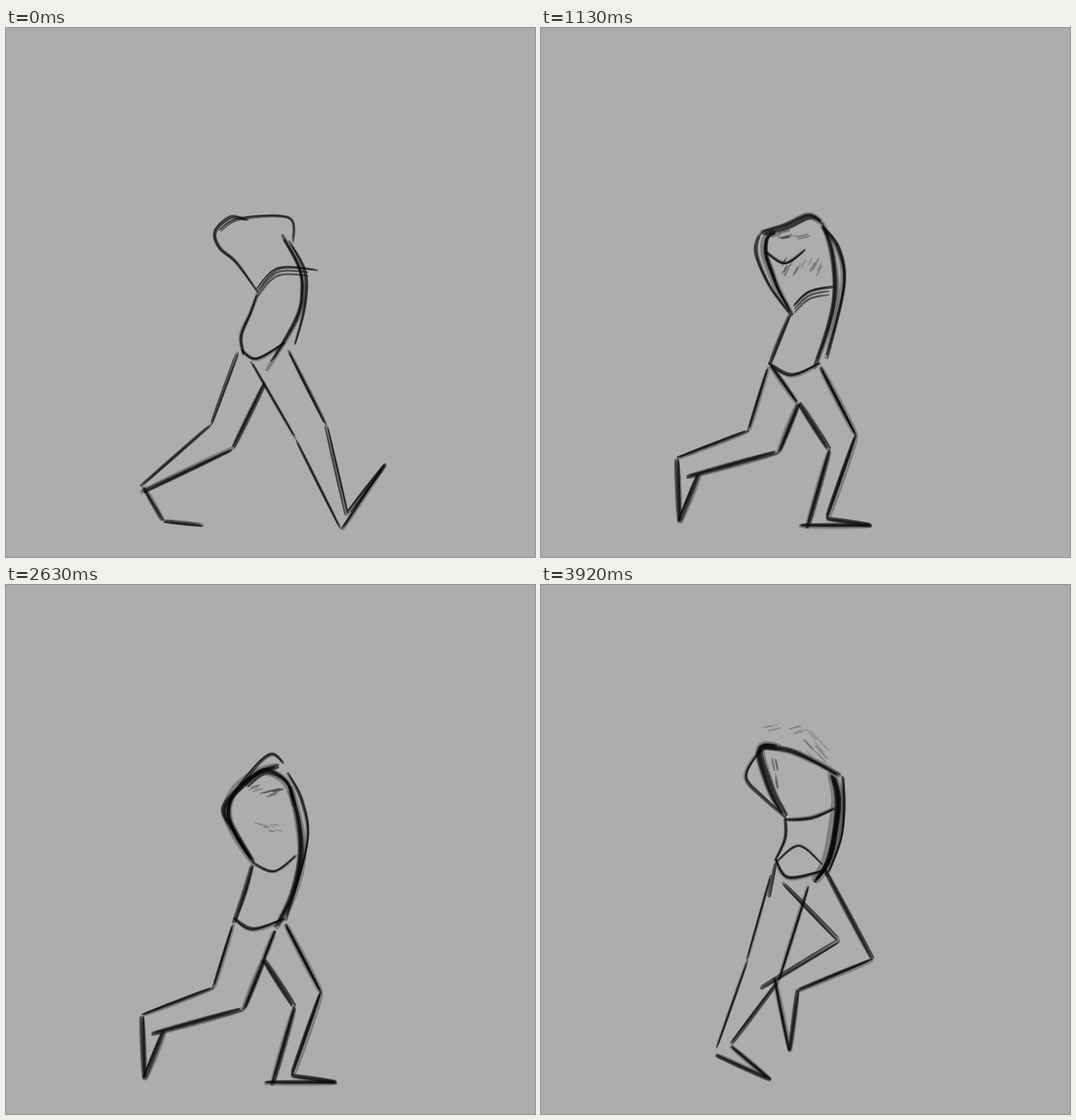
Animation, 748 px wide and 748 px high, one loop 4 s. Source, as an HTML page with a canvas:

```html
<!DOCTYPE html>
<html lang="en">
<head>
<meta charset="utf-8">
<title>Walk cycle sketch</title>
<style>
html, body { margin: 0; width: 100%; height: 100%; overflow: hidden; background: #adadad; }
canvas { display: block; width: 748px; height: 748px; }
</style>
</head>
<body>
<canvas id="stage" width="748" height="748"></canvas>
<script>
const ctx = document.getElementById('stage').getContext('2d');
const FPS = 24, LOOP = 4000;

// Key lines are [weight, x, y, x, y, ...]. A leg has a back edge, a front edge and a foot.
const contact = {
  rear: {
    back: [3, 328, 458, 290, 561, 190, 648],
    front: [5, 366, 502, 321, 594, 190, 657],
    foot: [4, 195, 648, 223, 697, 279, 703]
  },
  lead: {
    back: [2.5, 347, 472, 410, 582, 473, 708],
    front: [3.5, 399, 455, 452, 560, 482, 690],
    foot: [4, 483, 686, 537, 616, 475, 710]
  },
  torso: {
    back: [3, 342, 272, 318, 267, 296, 288, 302, 311, 326, 332, 356, 374],
    waist: [3.5, 356, 374, 346, 402, 332, 435, 336, 462],
    top: [2, 302, 287, 330, 270, 400, 268, 406, 304],
    front: [5, 390, 292, 414, 335, 420, 370, 411, 412, 368, 485],
    shell: [2.5, 400, 300, 423, 345, 422, 395, 408, 448],
    base: [3.5, 333, 455, 355, 468, 395, 445],
    band: [2, 354, 372, 385, 340, 441, 342]
  }
};

const down = {
  swing: {
    back: [4, 322, 479, 294, 570, 192, 609],
    front: [6, 364, 530, 336, 600, 206, 635],
    foot: [6, 192, 609, 196, 700, 224, 632]
  },
  stance: {
    back: [6, 365, 530, 408, 597, 376, 708],
    front: [6, 395, 479, 446, 577, 405, 695],
    foot: [5, 403, 694, 468, 704, 365, 704]
  },
  // Torso turned towards and away from the viewer, on alternate steps
  torsos: [{
    back: [7, 330, 288, 318, 296, 316, 318, 324, 342, 336, 372, 355, 406],
    flank: [3, 310, 290, 304, 308, 308, 330, 325, 368, 355, 408],
    waist: [4, 352, 404, 338, 438, 323, 476],
    top: [7, 310, 290, 345, 281, 378, 266, 398, 276],
    front: [6, 398, 275, 411, 315, 417, 370, 408, 420, 386, 482],
    shell: [5, 396, 280, 420, 312, 427, 366, 403, 468],
    base: [4, 322, 474, 355, 491, 396, 474],
    band: [2.5, 357, 394, 380, 373, 416, 366],
    crotch: [5, 324, 477, 362, 530],
    fold: [3, 318, 316, 345, 332, 374, 313]
  }, {
    back: [8, 385, 255, 352, 266, 322, 292, 313, 322, 325, 355, 350, 394],
    flank: [6, 340, 280, 316, 302, 309, 322, 324, 350, 350, 392],
    waist: [5, 348, 395, 338, 432, 322, 478],
    top: [7, 338, 284, 365, 264, 395, 278, 408, 312],
    front: [8, 402, 285, 414, 335, 418, 385, 405, 440, 381, 486],
    shell: [3, 397, 265, 418, 305, 425, 365, 395, 475],
    base: [4, 322, 471, 350, 487, 396, 472],
    band: [2.5, 349, 393, 380, 405, 412, 382],
    crotch: [5, 380, 489, 362, 535],
    hood: [3, 330, 285, 360, 250, 378, 240, 393, 252]
  }]
};

const up = {
  swing: {
    back: [4, 341, 420, 422, 503, 310, 571],
    front: [5, 400, 400, 469, 530, 360, 575],
    foot: [5, 330, 555, 352, 660, 363, 572]
  },
  stance: {
    back: [2.5, 325, 410, 292, 530, 248, 655],
    front: [4, 378, 425, 336, 560, 269, 650],
    foot: [5, 268, 652, 325, 700, 247, 664]
  },
  torso: {
    back: [9, 340, 230, 316, 227, 310, 240, 319, 272, 330, 300, 346, 327],
    flank: [3, 322, 225, 302, 243, 289, 273, 313, 300, 345, 328],
    waist: [3, 345, 326, 345, 358, 331, 390],
    top: [6, 315, 230, 350, 234, 388, 250, 424, 270],
    front: [12, 410, 264, 419, 300, 415, 345, 405, 390, 386, 420],
    shell: [4, 426, 270, 427, 315, 422, 360, 403, 412],
    base: [4, 331, 387, 350, 414, 402, 404],
    band: [4, 345, 332, 382, 329, 416, 315],
    crotch: [2.5, 332, 392, 322, 442],
    pelvis: [2, 333, 392, 365, 368, 398, 395]
  }
};

// Halfway pose; keeps only the lines both sides have
function between(a, b) {
  if (typeof a === 'number') return (a + b) / 2;
  if (Array.isArray(a)) return a.map((v, i) => between(v, b[i]));
  const shared = Object.keys(a).filter(k => k in b);
  return Object.fromEntries(shared.map(k => [k, between(a[k], b[k])]));
}

let seed = 1;
function rand(lo, hi) {
  seed = seed * 16807 % 2147483647;
  return lo + (hi - lo) * seed / 2147483647;
}

function spline(p, t) {
  const n = p.length / 2 - 1;
  const i = Math.min(n - 1, Math.floor(t * n)), u = t * n - i;
  const at = (k, c) => p[2 * Math.max(0, Math.min(n, k)) + c];
  return [0, 1].map(c => {
    const a = at(i - 1, c), b = at(i, c), d = at(i + 1, c), e = at(i + 2, c);
    return b + u / 2 * (d - a + u * (2 * a - 5 * b + 4 * d - e + u * (3 * (b - d) + e - a)));
  });
}

// One tapered pencil mark along part of a curve
function mark(p, width, dark, from = 0, to = 1) {
  const steps = 24, left = [], right = [];
  for (let i = 0; i <= steps; i++) {
    const t = from + (to - from) * i / steps;
    const [x, y] = spline(p, t);
    const [ax, ay] = spline(p, Math.max(0, t - .02));
    const [bx, by] = spline(p, Math.min(1, t + .02));
    const len = Math.hypot(bx - ax, by - ay) || 1;
    const r = width / 2 * (.5 + .5 * Math.sqrt(Math.max(0, Math.sin(Math.PI * i / steps))));
    const nx = (ay - by) / len * r, ny = (bx - ax) / len * r;
    left.push([x + nx, y + ny]);
    right.unshift([x - nx, y - ny]);
  }
  ctx.fillStyle = `rgba(8,8,8,${dark})`;
  ctx.beginPath();
  left.concat(right).forEach(q => ctx.lineTo(...q));
  ctx.fill();
}

// A soft smear under a few loose passes
function sketch([weight, ...p]) {
  const loose = 1 + weight * .22;
  mark(p, weight * 1.5 + 1, .28);
  for (let pass = 0; pass < 3; pass++) {
    const dx = rand(-loose, loose), dy = rand(-loose, loose);
    const q = p.map((v, i) => v + (i % 2 ? dy : dx) + rand(-1, 1));
    mark(q, 1.2 + weight * .42, .4 + weight * .025, rand(0, .08), rand(.92, 1));
  }
}

function drawLeg({ back, front, foot }) {
  for (const [weight, ...p] of [back, front, foot]) {
    sketch([weight, ...p.slice(0, 4)]);
    sketch([weight, ...p.slice(2)]);
  }
}

function hatch(x, y, w, h, count, dx, dy, dark) {
  for (let i = 0; i < count; i++) {
    const a = x + rand(0, w), b = y + rand(0, h), k = rand(.5, 1);
    mark([a, b, a + dx * k, b + dy * k], rand(1.5, 3), dark * rand(.5, 1));
  }
}

function drawFigure(legs, torso, extraBands) {
  legs.forEach(drawLeg);
  Object.values(torso).forEach(sketch);
  for (let i = 1; i <= extraBands; i++) {
    mark(torso.band.slice(1).map((v, k) => k % 2 ? v + i * 5 : v), 3, .55, .05, .85);
  }
}

const poses = [
  (side, extra) => drawFigure([contact.rear, contact.lead], contact.torso, extra),
  (side, extra) => {
    drawFigure([down.swing, down.stance], down.torsos[side], extra);
    if (side) {
      hatch(335, 286, 50, 14, 9, 18, -5, .5);
      hatch(348, 336, 35, 14, 7, 14, 2, .3);
    } else {
      hatch(345, 322, 55, 18, 14, -9, 18, .35);
      hatch(325, 288, 45, 12, 8, 20, -5, .5);
    }
  },
  (side, extra) => {
    const legs = ['swing', 'stance'].map(k => between(down[k], up[k]));
    drawFigure(legs, between(down.torsos[side], up.torso), extra);
  },
  (side, extra) => {
    drawFigure([up.swing, up.stance], up.torso, extra);
    hatch(310, side ? 200 : 194, 50, 12, 6, 20, -5, .25);
    hatch(370, side ? 196 : 191, 40, 45, 9, 18, 20, .25);
    hatch(325, 240, 8, 35, 6, 5, 22, .4);
  }
];

// Four poses per step, three film frames each; even steps open with extra shirt lines
let shown = -1;
function tick() {
  const t = performance.now() % LOOP;
  const frame = Math.floor((t + 2) * FPS / 1000) % (LOOP * FPS / 1000);
  if (frame !== shown) {
    shown = frame;
    ctx.fillStyle = '#adadad';
    ctx.fillRect(0, 0, 748, 748);
    const pose = Math.floor(frame / 3) % 4, side = Math.floor(frame / 12) % 2;
    seed = 101 + pose * 977;
    poses[pose](side, frame % 3 === 0 && side === 0 ? 2 : 0);
  }
  requestAnimationFrame(tick);
}
tick();
</script>
</body>
</html>
```
